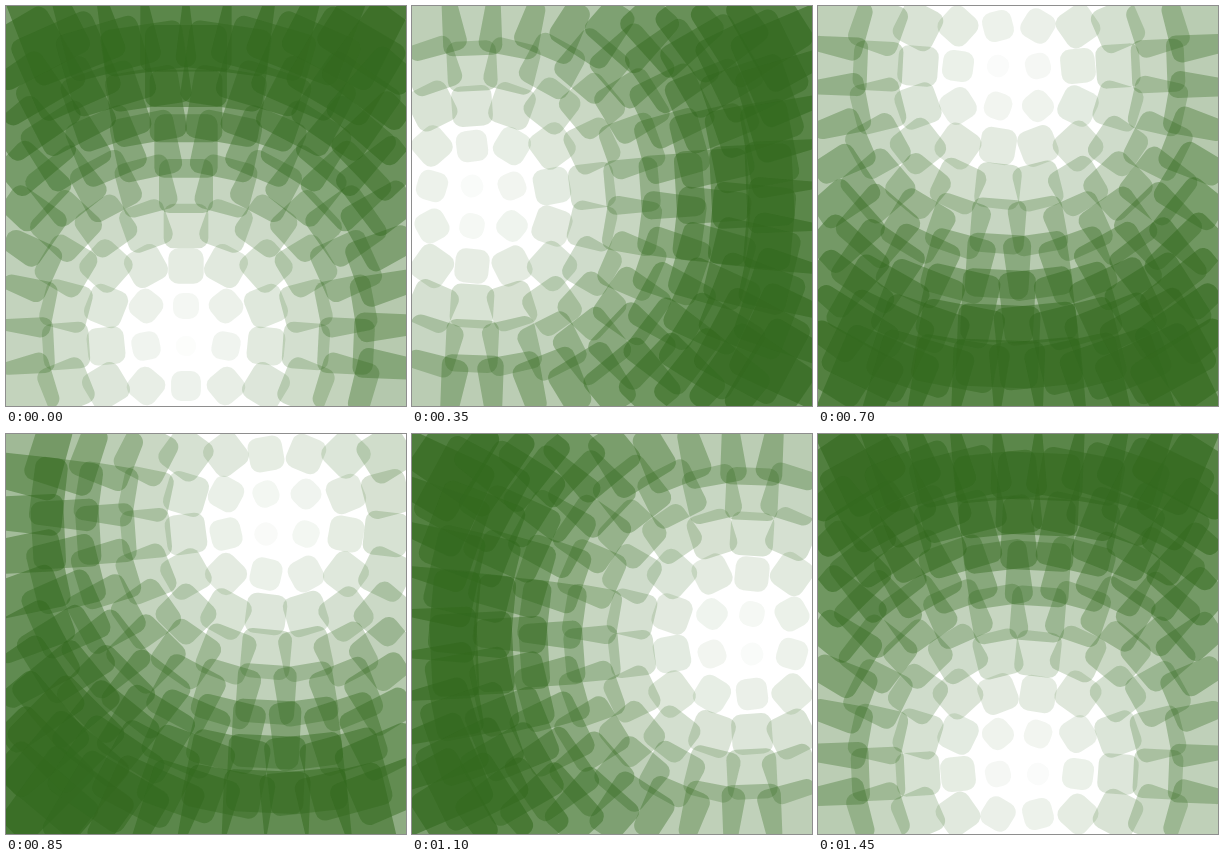
An HTML page with a canvas for the animation above (1.5 s loop, 400x400 px).

```html
<!DOCTYPE html>
<html>
<head>
<meta charset="utf-8">
<style>
  html, body { margin: 0; width: 100%; height: 100%; overflow: hidden; background: #fff; }
  canvas { display: block; }
</style>
</head>
<body>
<canvas id="stage" width="400" height="400"></canvas>
<script>
const SIZE = 400, CELL = 40, LOOP = 1500, STEP = 50;
const ORBIT = SIZE / 3, START = Math.PI / 2 + 0.15;
const DIAGONAL = SIZE * Math.SQRT2;
const ctx = document.getElementById('stage').getContext('2d');

function drawTile(x, y, focusX, focusY) {
  const dx = x - focusX, dy = y - focusY;
  const dist = Math.hypot(dx, dy);
  const side = 18.6 + 0.233 * dist;
  ctx.save();
  ctx.translate(x, y);
  ctx.rotate(Math.atan2(dy, dx));
  ctx.globalAlpha = dist / DIAGONAL;
  ctx.beginPath();
  ctx.roundRect(-side / 2, -side / 2, side, side, Math.min(10, side / 2));
  ctx.fill();
  ctx.restore();
}

function draw(now) {
  const time = Math.floor((now % LOOP) / STEP) * STEP;
  const angle = START + time / LOOP * Math.PI * 2;
  const focusX = SIZE / 2 + ORBIT * Math.cos(angle);
  const focusY = SIZE / 2 + ORBIT * Math.sin(angle);
  ctx.clearRect(0, 0, SIZE, SIZE);
  ctx.fillStyle = '#33691e';
  for (let x = CELL / 2; x < SIZE; x += CELL)
    for (let y = CELL / 2; y < SIZE; y += CELL)
      drawTile(x, y, focusX, focusY);
}

const begin = performance.now();
function loop() {
  draw(performance.now() - begin);
  requestAnimationFrame(loop);
}
loop();
</script>
</body>
</html>
```
